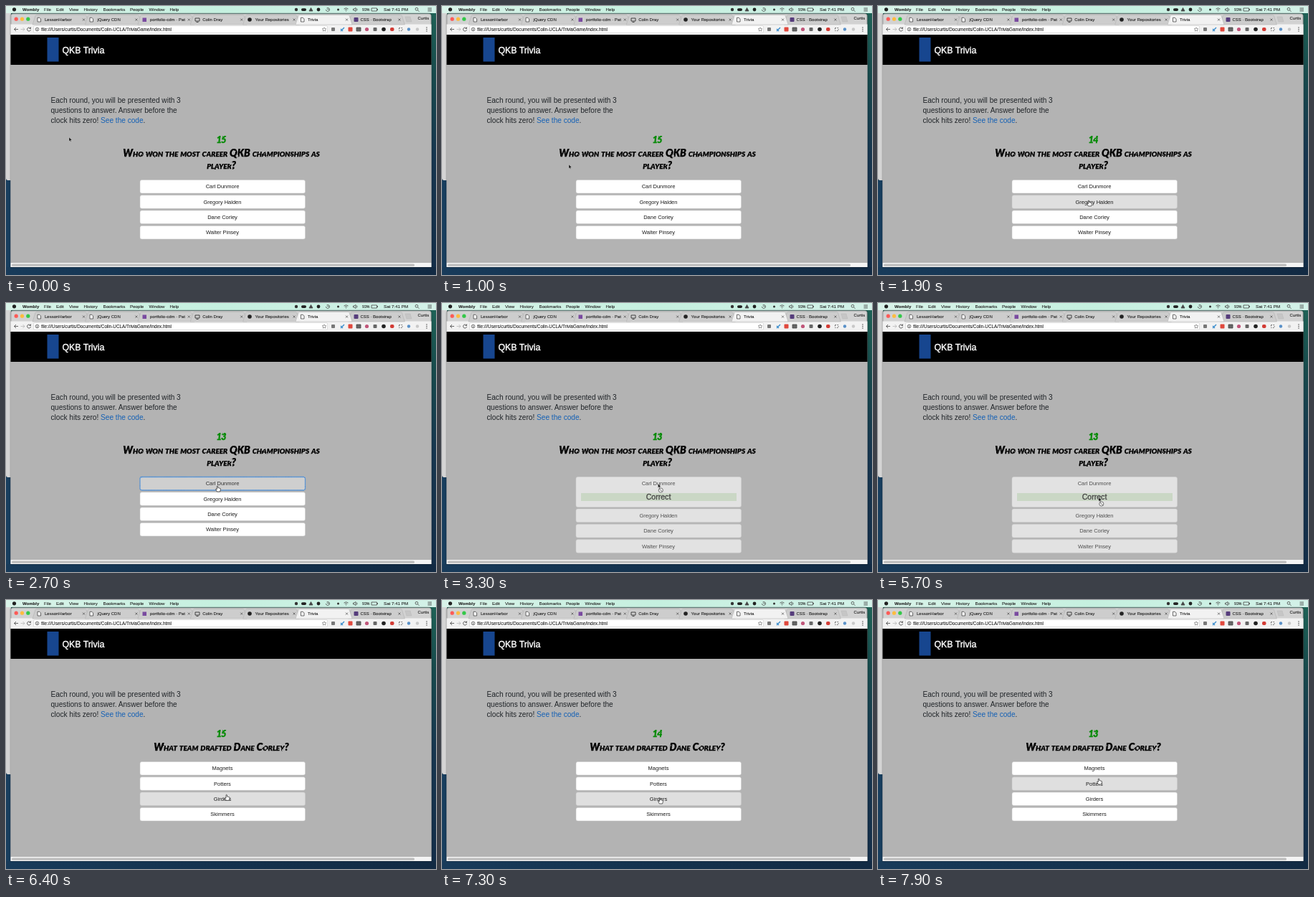
Write an HTML page that moves like this. It is 600 px wide and 375 px high and loops after 8 s.

```html
<!DOCTYPE html>
<html lang="en">
<head>
<meta charset="utf-8">
<title>Trivia</title>
<style>
  html, body { margin: 0; width: 100%; height: 100%; overflow: hidden; background: #0d2035; }
  svg { display: block; width: 100%; height: 100%; font-family: "Liberation Sans", Arial, sans-serif; }
  text { white-space: pre; }
  .marker { font: italic 900 14px Lato, "Open Sans", sans-serif; font-variant-caps: small-caps; text-anchor: middle; stroke: #000; stroke-width: .25; }
  .timer { font-size: 13px; letter-spacing: -1px; fill: #078a07; stroke: #078a07; }
  .answer { font-size: 7.5px; text-anchor: middle; }
  .small { font-size: 6px; fill: #222; stroke: #222; stroke-width: .1; }
  .line { fill: none; stroke: #444; stroke-width: .8; }
</style>
</head>
<body>
<svg id="stage" viewBox="0 0 600 375" preserveAspectRatio="none">
  <defs>
    <linearGradient id="sea" x2="0" y2="1">
      <stop offset="0" stop-color="#1f6558"/>
      <stop offset=".25" stop-color="#174a4c"/>
      <stop offset=".55" stop-color="#17364f"/>
      <stop offset="1" stop-color="#132d48"/>
    </linearGradient>
    <linearGradient id="floor">
      <stop offset="0" stop-color="#183b5a"/>
      <stop offset=".5" stop-color="#14324e"/>
      <stop offset="1" stop-color="#122a43"/>
    </linearGradient>
    <linearGradient id="bar">
      <stop offset="0" stop-color="#d9f3e9"/>
      <stop offset=".5" stop-color="#c5f0df"/>
      <stop offset="1" stop-color="#d3f1e8"/>
    </linearGradient>
    <filter id="rough" x="-5%" y="-20%" width="110%" height="140%">
      <feTurbulence type="fractalNoise" baseFrequency=".16" numOctaves="2" seed="4"/>
      <feDisplacementMap in="SourceGraphic" scale="1.8" xChannelSelector="R" yChannelSelector="G"/>
    </filter>
    <clipPath id="tabClip"><rect x="199" y="12" width="51" height="14"/></clipPath>
  </defs>

  <!-- desktop -->
  <rect width="600" height="375" fill="url(#sea)"/>
  <rect y="243" width="7" height="132" fill="#183e5e"/>
  <rect y="364" width="600" height="11" fill="url(#floor)"/>
  <path d="M0 10H7V243H3Q0 243 0 240Z" fill="#d4d4d4"/>
  <rect width="600" height="10" fill="url(#bar)"/>
  <g id="menu"></g>

  <!-- browser window -->
  <path d="M6.5 364V14Q6.5 10.500 10 10.500H590Q593.500 10.500 593.500 14V364Z" fill="#d2d2d2" stroke="#000" stroke-opacity=".2" stroke-width="2"/>
  <rect x="6.500" y="25.500" width="587" height="14.500" fill="#f2f2f2"/>
  <g id="tabs"></g>
  <g id="tools"></g>

  <!-- page -->
  <rect x="6.500" y="40" width="587" height="42" fill="#000"/>
  <rect x="57.500" y="44" width="16" height="33.500" fill="#17468f"/>
  <text x="78.500" y="66" font-size="12.300" fill="#fff" stroke="#fff" stroke-width=".4">QKB Trivia</text>
  <rect x="6.500" y="82" width="587" height="276" fill="#b3b3b3"/>
  <g font-size="10.100" fill="#212529">
    <text x="62.500" y="135">Each round, you will be presented with 3</text>
    <text x="62.500" y="149">questions to answer. Answer before the</text>
    <text x="62.500" y="163">clock hits zero! <tspan fill="#1762b5">See the code</tspan>.</text>
  </g>
  <g filter="url(#rough)">
    <text id="timer" class="marker timer" x="300" y="190.800"></text>
    <text id="ask1" class="marker" x="300.500" y="210"></text>
    <text id="ask2" class="marker" x="300.500" y="227"></text>
  </g>
  <g id="answers"></g>
  <g id="verdict">
    <rect x="194" y="265" width="217" height="11" fill="#cad7c5"/>
    <text x="302" y="274.300" font-size="10.600" text-anchor="middle" fill="#444" stroke="#444" stroke-width=".3">Correct</text>
  </g>

  <!-- scroll bar -->
  <rect x="6.500" y="358" width="587" height="6" fill="#f4f4f4"/>
  <rect x="8" y="359.500" width="562" height="3.300" rx="1.600" fill="#bdbdbd"/>

  <g id="cursor">
    <path id="arrow" d="M0 0V5.600L1.300 4.400L2.200 6.300L3 5.900L2.200 4.100H4Z" fill="#111" stroke="#ddd" stroke-width=".35"/>
    <g id="barred" fill="none" stroke="#777">
      <circle cx="3.800" cy="9" r="3.100" fill="#eee" stroke-width="1"/>
      <path d="M1.700 6.900L5.900 11.100" stroke-width="1"/>
    </g>
    <path id="hand" d="M-.7 .4Q0 -.7 .7 .4V2.600L2.600 3L4.300 3.700V5.500L3.600 8H-.6L-2.500 4.700Q-2.200 3.700 -1.300 4.400L-.7 5Z"
      fill="#fff" stroke="#222" stroke-width=".7" stroke-linejoin="round"/>
  </g>
</svg>

<script>
const $ = id => document.getElementById(id);
const NS = "http://www.w3.org/2000/svg";

function set(el, attrs) {
  for (const key in attrs) el.setAttribute(key, attrs[key]);
  return el;
}
function add(parent, tag, attrs, text) {
  const el = set(document.createElementNS(NS, tag), attrs);
  if (text) el.textContent = text;
  parent.appendChild(el);
  return el;
}
const label = (parent, x, y, text, extra) => add(parent, "text", { class: "small", x, y, ...extra }, text);
const stroke = (parent, d, extra) => add(parent, "path", { class: "line", d, ...extra });
const dot = (parent, cx, cy, r, fill) => add(parent, "circle", { cx, cy, r, fill });
const box = (parent, x, y, width, height, fill, rx = 0) => add(parent, "rect", { x, y, width, height, fill, rx });

function drawMenu() {
  const g = $("menu");
  dot(g, 11.5, 4.8, 2.6, "#222");
  label(g, 23, 7, "Wombly", { "font-weight": 700 });
  [[53, "File"], [70, "Edit"], [88, "View"], [108.5, "History"], [135.5, "Bookmarks"], [173, "People"],
   [199.5, "Window"], [228.5, "Help"], [527, "Sat 7:41 PM"]].forEach(([x, s]) => label(g, x, 7, s, { style: "font-size:6.2px" }));
  label(g, 497, 6.8, "93%", { style: "font-size:5.2px" });

  dot(g, 405, 5, 2.2, "#333");
  box(g, 412, 3.2, 7, 3.8, "#222", 1.9);
  stroke(g, "M423 7L425.500 2.500L428 7Z", { style: "fill:#444" });
  dot(g, 436, 5, 2.4, "#222");
  stroke(g, "M446.500 5A2.500 2.500 0 1 0 447.500 3M449 3.500V5H450.500");
  dot(g, 463.5, 5, 1.5, "#333");
  stroke(g, "M471.500 4Q474.500 1.500 477.500 4M472.800 5.500Q474.500 4 476.200 5.500M474.500 6.500V7.500");
  stroke(g, "M484.500 4H486L488 2.500V7.500L486 6H484.500ZM489.500 3.500Q490.500 5 489.500 6.500");
  stroke(g, "M510 3H517.500V7H510ZM518.500 4V6");
  add(g, "circle", { class: "line", cx: 573, cy: 4.300, r: 1.900 });
  stroke(g, "M574.500 5.800L576.500 7.800M588.500 3H594M588.500 5H594M588.500 7H594");
}

function drawTab(x, text, active) {
  const g = $("tabs");
  add(g, "path", {
    d: `M${x - 4} 26L${x} 13.500Q${x + .5} 12.500 ${x + 2} 12.500H${x + 69}Q${x + 70.5} 12.500 ${x + 71} 13.500L${x + 75} 26Z`,
    fill: active ? "#f2f2f2" : "#cdcdcd", stroke: "#aaa", "stroke-width": .5
  });
  const tag = label(add(g, "g", {}), x + 13, 21.3, text);
  if (text.length > 18) tag.parentNode.setAttribute("clip-path", "url(#tabClip)");
  stroke(g, `M${x + 66} 17.600l3 3m0 -3l-3 3`, { style: "stroke-width:.7" });
}

function drawTabs() {
  const g = $("tabs");
  ["#fc5b57", "#fdbc40", "#34c84a"].forEach((c, i) => dot(g, 14.2 + 8.3 * i, 18.2, 2.6, c));
  ["LessonHarbor", "jQuery CDN", "portfolio-cdm \u00b7 Patchery", "Colin Dray", "Your Repositories", "", "CSS \u00b7 Bootstrap"]
    .forEach((s, i) => s && drawTab(41 + 73.4 * i, s));
  drawTab(408, "Trivia", true);

  const page = x => stroke(g, `M${x} 16.300h2.800l1.700 1.700v4h-4.500z`, { style: "fill:#fff" });
  [44, 117, 411.5].forEach(page);
  box(g, 190.5, 16.5, 5.5, 5.5, "#7a4ba0");
  stroke(g, "M264 17H270V21H264ZM265.500 22.500H268.500", { style: "stroke:#222" });
  dot(g, 340, 19, 2.8, "#222");
  box(g, 485.5, 16, 6, 6, "#563d7c", 1);
  add(g, "path", { d: "M557 15h7l2 7h-7z", fill: "#c6c6c6", stroke: "#b4b4b4", "stroke-width": .4 });
  label(g, 574.5, 19.4, "Curtis");
}

function drawTools() {
  const g = $("tools");
  stroke(g, "M17 32.500H11.500M14 30L11.500 32.500L14 35");
  stroke(g, "M20.500 32.500H26M23.500 30L26 32.500L23.500 35", { style: "stroke:#b5b5b5" });
  stroke(g, "M34 31A2.500 2.500 0 1 0 34.500 33M34.500 29.500V31.500H32.500");
  set(box(g, 38.5, 27.5, 410, 10, "#fff", 1.5), { stroke: "#c4c4c4", "stroke-width": .5 });
  add(g, "circle", { class: "line", cx: 43.500, cy: 32.500, r: 2.300 });
  stroke(g, "M43.500 32V34M43.500 31V31.500");
  label(g, 49, 34.7, "file:///Users/curtis/Documents/Colin-UCLA/TriviaGame/index.html", { style: "font-size:6.32px" });
  stroke(g, "M444 29.800l.8 1.800 2 .2-1.500 1.300.5 2-1.800-1-1.800 1 .5-2-1.500-1.300 2-.2z", { style: "stroke-width:.5" });

  box(g, 454, 30, 5, 5, "#777", 1);
  stroke(g, "M467 35L472 30M467 32L470 35", { style: "stroke:#398ccc;stroke-width:1.4" });
  box(g, 477.5, 29.5, 6, 6, "#e0483d", 1);
  stroke(g, "M489 30H495V35H489Z", { style: "fill:#666" });
  dot(g, 503.5, 32.5, 2.6, "#c0567a");
  box(g, 512.5, 30, 5, 5, "#666", 1);
  dot(g, 527, 32.5, 2.8, "#222");
  box(g, 536, 30, 5.5, 5, "#d23b34", 2);
  stroke(g, "M548.500 30.500H553V34.500H548.500Z", { style: "stroke-dasharray:1.5" });
  dot(g, 562, 32.5, 2.2, "#5a91c8");
  dot(g, 574, 32.5, 2.2, "#c8c8c8");
  [30, 32.5, 35].forEach(y => dot(g, 587, y, .8, "#555"));
}

const ROUNDS = [
  { ask: ["Who won the most career QKB championships as", "player?"], top: 242.5,
    answers: ["Carl Dunmore", "Gregory Halden", "Dane Corley", "Walter Pinsey"] },
  { ask: ["What team drafted Dane Corley?", ""], top: 225.5,
    answers: ["Magnets", "Potters", "Girders", "Skimmers"] }
];
const LOOP = 8000, PRESS = 2600, ANSWERED = 2850, NEXT = 5850;
const COUNTS = [[0, 15], [1650, 14], [2650, 13], [5850, 15], [6850, 14], [7850, 13]];
const PATH = [
  [0, 88, 183], [500, 88, 183], [1600, 294, 271], [1900, 294, 271], [2400, 295, 255], [3000, 295, 255],
  [3900, 320, 243.5], [4500, 320, 243.5], [5300, 308, 271], [6300, 308, 271], [6900, 304, 276],
  [7300, 304, 276], [7800, 308, 249], [8000, 308, 249]
];

function pointer(t) {
  const i = PATH.findIndex(p => p[0] > t);
  const [t0, x0, y0] = PATH[i - 1], [t1, x1, y1] = PATH[i];
  const p = (t - t0) / (t1 - t0), e = p * p * (3 - 2 * p);
  return [x0 + (x1 - x0) * e, y0 + (y1 - y0) * e];
}

const buttons = [0, 1, 2, 3].map(() => ({
  rect: add($("answers"), "rect", { x: 187, width: 230.5, rx: 2.5 }),
  text: add($("answers"), "text", { class: "answer", x: 302 })
}));
const show = (id, on) => set($(id), { visibility: on ? "visible" : "hidden" });

function render(t) {
  const round = ROUNDS[t < NEXT ? 0 : 1];
  const locked = t >= ANSWERED && t < NEXT;
  const [px, py] = pointer(t);
  let over = false;

  $("timer").textContent = COUNTS.filter(c => c[0] <= t).pop()[1];
  $("ask1").textContent = round.ask[0];
  $("ask2").textContent = round.ask[1];

  buttons.forEach(({ rect, text }, i) => {
    const y = round.top + 21.3 * i + (locked && i ? 23.3 : 0);
    const height = locked && !i ? 42 : 18.5;
    const hover = px > 187 && px < 417.5 && py > y && py < y + height;
    const pressed = !i && t >= PRESS && t < ANSWERED;
    over = over || hover;
    set(rect, {
      y, height,
      fill: locked ? "#e2e2e2" : pressed ? "#cfcfcf" : hover ? "#dfdfdf" : "#fff",
      stroke: pressed ? "#3f88d8" : locked ? "#d0d0d0" : "#c6c6c6",
      "stroke-width": pressed ? 1.3 : .5,
      "stroke-dasharray": pressed ? "1.6 .5" : "none"
    });
    set(text, { y: y + 11.9, fill: locked ? "#505050" : pressed ? "#333" : "#1c1c1c" });
    text.textContent = round.answers[i];
  });

  show("verdict", locked);
  show("hand", over && !locked);
  show("arrow", !over || locked);
  show("barred", over && locked);
  set($("cursor"), { transform: `translate(${px} ${py})` });
}

function tick() {
  render(Math.floor(performance.now() % LOOP / 100) * 100);
  requestAnimationFrame(tick);
}

drawMenu();
drawTabs();
drawTools();
tick();
</script>
</body>
</html>
```
